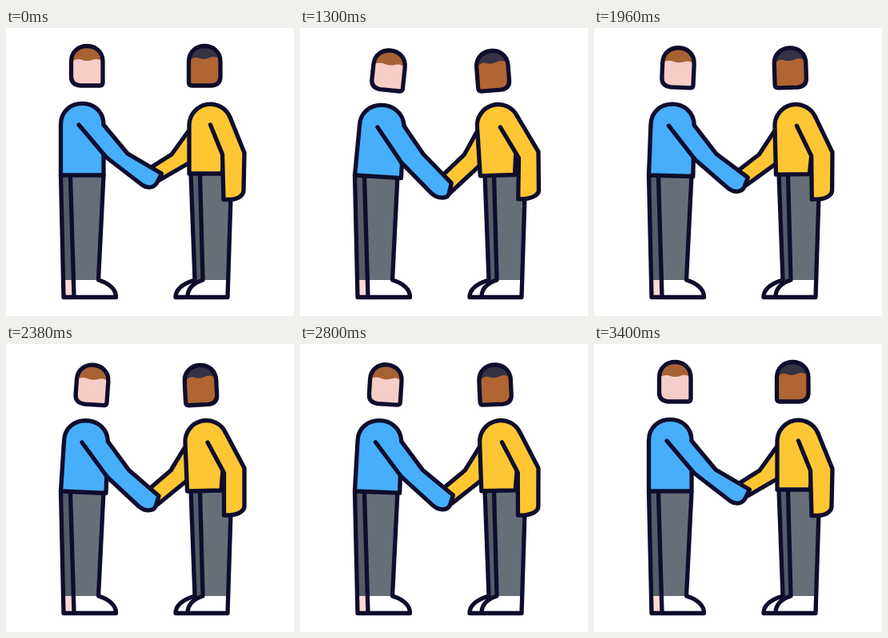
Recreate the animation shown at these times as an HTML page. Size 360 px wide and 360 px high, loop 3.43 s.

```html
<!DOCTYPE html>
<html lang="en">
<head>
<meta charset="utf-8">
<title>Handshake</title>
<style>
  html, body { margin: 0; width: 100%; height: 100%; overflow: hidden; background: #fff; }
  svg { display: block; width: 100vw; height: 100vh; }
  .line { stroke: #0e0d2c; stroke-width: 5.3; stroke-linecap: round; stroke-linejoin: round; }
</style>
</head>
<body>
<svg viewBox="0 0 360 360">
  <!-- left legs -->
  <path fill="#666f78" d="M69 184H122L116 315H72Z"/>
  <path fill="#555c67" d="M69 184H80L85 315H72Z"/>
  <path fill="#fbd9d5" d="M72 315H85V336H72Z"/>
  <path class="line" fill="none" d="M68.500 184L72 336.500H137.500C137.500 326 128 319 115.500 315L122 184M80.500 186L85 336"/>

  <!-- right legs -->
  <path fill="#555c67" d="M231 182H243L246 315H236Z"/>
  <path fill="#666f78" d="M242 182H282L278 315H246Z"/>
  <path class="line" fill="none" d="M231 182L236 315C223 319 212 325 212 336.500H277L281 210M242.500 184L246 315C234 319 227 326 227 336"/>

  <path id="backArm" class="line" fill="#ffc633"/>
  <path id="rightBody" class="line" fill="#ffc633"/>
  <path id="rightArm" class="line" fill="#ffc633"/>
  <path id="leftBody" class="line" fill="#47aefc"/>
  <path id="leftArm" class="line" fill="#47aefc"/>

  <g id="leftHead">
    <path fill="#f7cdc7" d="M81.500 42C81.500 16 121 16 121 42V68Q121 72 117 72H93Q81.500 71 81.500 61Z"/>
    <path fill="#a86132" d="M81.500 42C81.500 16 121 16 121 42Q115 37 109 39.500T97 40.500Q88 37 81.500 42Z"/>
    <path class="line" fill="none" d="M81.500 42C81.500 16 121 16 121 42V68Q121 72 117 72H93Q81.500 71 81.500 61Z"/>
  </g>
  <g id="rightHead">
    <path fill="#b06532" d="M268 42C268 16 228.500 16 228.500 42V68Q228.500 72 232.500 72H257Q268 71 268 61Z"/>
    <path fill="#343244" d="M268 42C268 16 228.500 16 228.500 42Q235 35 241 37.500T253 37.500Q261 34 268 39Z"/>
    <path class="line" fill="none" d="M268 42C268 16 228.500 16 228.500 42V68Q228.500 72 232.500 72H257Q268 71 268 61Z"/>
  </g>
</svg>
<script>
const LOOP = 3430, START = 1000, END = 3400, SHAKE = 800, DEPTH = 1.73;
const el = id => document.getElementById(id);

// Each limb: upright outline, leaning outline
const limbs = {
  backArm: ["M228 129L207 158L180 175L192 190L230 168",
            "M223 130L206 158L178 182L189 201L227 170"],
  rightBody: ["M229 182L229 121A26.5 26.5 0 0 1 280 111.5L270 182Z",
              "M226.5 184L224 124A26.5 26.5 0 0 1 274.5 111L269 183Z"],
  rightArm: ["M255.5 121L270.5 158L272 214.5L280 214.5C292 214 297 208 297 203L298 156L280 111.5",
             "M252 123L272.5 161L272.5 214L280 214C292 213 298 208 298 203L298 155L274.5 111"],
  leftBody: ["M68.5 184L68.5 121C68.5 85.5 122 85.5 122 121L122 184Z",
             "M68.5 184L72.5 122C73 87 126 87 127.5 122L125 186.5Z"],
  leftArm: ["M91 121L124 160Q127 163 131 166L170 196C177 201 185 200 189 193L194.5 182L152 157L122 121",
            "M95 123L123.5 162Q126 166 129.5 169L166 203C174 210 184 209 187 203L191 190L153.5 157.5L127.5 122"]
};

function mix(from, to, k) {
  const target = to.match(/[\d.]+/g);
  let i = 0;
  return from.replace(/[\d.]+/g, a => +(+a + (target[i++] - a) * k).toFixed(2));
}

function tilt(id, k, dx, dy, angle, cx) {
  el(id).setAttribute("transform", `translate(${dx * k} ${dy * k}) rotate(${angle * k} ${cx} 48)`);
}

function draw(now) {
  const t = now % LOOP;
  const moving = t > START && t < END;
  const k = moving ? DEPTH * (1 - Math.cos((t - START) / SHAKE * 2 * Math.PI)) / 2 : 0;
  for (const id in limbs) el(id).setAttribute("d", mix(...limbs[id], k));
  tilt("leftHead", k, 6.5, 3.7, 4, 101);
  tilt("rightHead", k, -5, 4, -3, 248);
  requestAnimationFrame(draw);
}
draw(performance.now());
</script>
</body>
</html>
```
